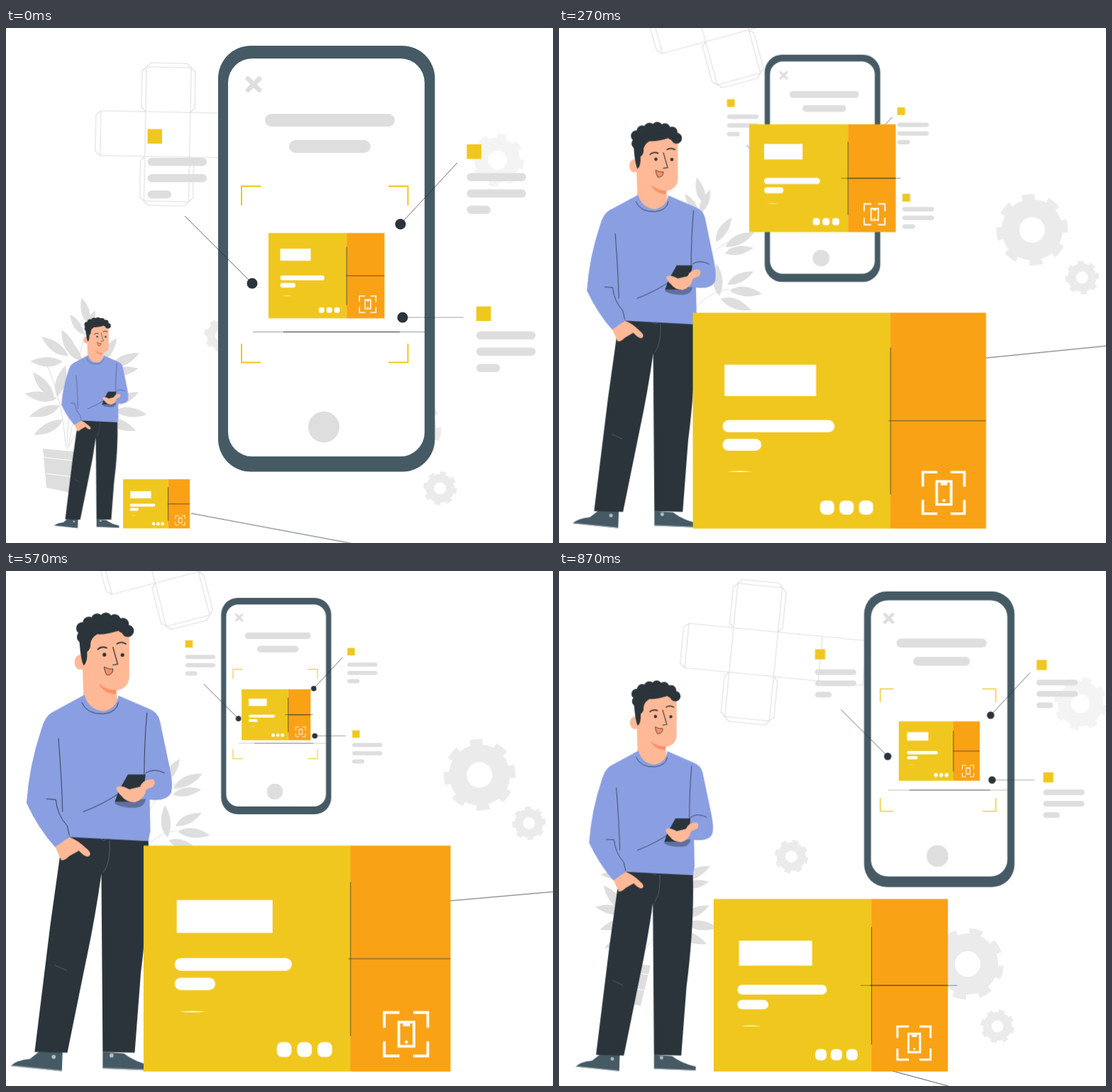
An HTML page without scripts that plays this animation: 771 px wide and 726 px high, repeating every 0.9 s.

```html
<!DOCTYPE html>
<html lang="en">
<head>
<meta charset="utf-8">
<title>Package scan</title>
<style>
  html, body { margin: 0; height: 100%; overflow: hidden; background: #fff; }
  svg { display: block; width: 100vw; height: 100vh; }

  .yellow { fill: #f0c71e; }
  .orange { fill: #f9a215; }
  .white { fill: #fff; }
  .grey { fill: #dedede; }
  .dark { fill: #2a343a; }
  .slate { fill: #455a64; }
  .skin { fill: #ffb997; }
  .blush { fill: #ff8f66; }
  .shirt { fill: #8a9ee2; }
  .line { fill: none; stroke: #263238; stroke-width: .9; }
  .hair-line { vector-effect: non-scaling-stroke; stroke-width: .7; }
  .reach { stroke-width: .5; }
  .net { fill: none; stroke: #dedede; stroke-width: 1.1; }
  .gear { fill: none; stroke: currentColor; }
  .icon { fill: none; stroke: #fff; stroke-width: 4; }

  .phone, .backdrop, .box, .plant { animation: 900ms cubic-bezier(.67, 0, .33, 1) infinite; }
  .phone { animation-name: phone; transform-origin: 451.5px 325px; }
  .backdrop { animation-name: backdrop; transform-origin: 450px 300px; }
  .box { animation-name: box; }
  .plant { animation-name: plant; }
  .man { animation: man 900ms cubic-bezier(.37, 0, .63, 1) infinite; transform-origin: 120px 705px; }
  .pulse { animation: pulse 450ms linear infinite; transform-origin: 451.6px 347.5px; }
  .pulse .reach { animation: reach-pulse 450ms step-end infinite; }
  .box .reach { animation: reach-box 900ms step-end infinite; }

  @keyframes phone {
    0%, 6.2% { transform: none; animation-timing-function: cubic-bezier(.76, 0, .24, 1); }
    40.7%, 51.2% { transform: translate(-88.3px, -140px) scale(.487); }
    92.9%, 100% { transform: translate(84.3px, -88px) scale(.694); }
  }
  @keyframes backdrop {
    0%, 6.2% { transform: translate(-32.5px, 21.2px) rotate(-4.5deg); animation-timing-function: cubic-bezier(.76, 0, .24, 1); }
    40.7%, 51.2% { transform: translate(13px, -231px) rotate(-22.4deg); }
    92.9%, 100% { transform: none; }
  }
  @keyframes box {
    0%, 6.2% { transform: translate(165px, 705.5px) scale(.2115); animation-timing-function: cubic-bezier(.76, 0, .24, 1); }
    40.7%, 50.6% { transform: translate(191px, 705.5px) scale(1); }
    93.3%, 100% { transform: translate(218px, 705.5px) scale(.742); }
  }
  @keyframes plant {
    0%, 6.2% { transform: none; animation-timing-function: cubic-bezier(.76, 0, .24, 1); }
    40.7%, 51.2% { transform: translate(96px, -187px); }
    92.9%, 100% { transform: translate(25px, -42px); }
  }
  @keyframes man {
    0% { transform: scale(.441); }
    46.67% { transform: scale(1.007); }
    96.67%, 100% { transform: scale(.817); }
  }
  @keyframes pulse {
    0% { transform: none; animation-timing-function: ease-in; }
    26.67% { transform: scale(1.16); }
    46.67% { transform: scale(2.14); }
    60% { transform: scale(2.36); animation-timing-function: ease-out; }
    73.33% { transform: scale(2.65); animation-timing-function: ease-in-out; }
    93.33%, 100% { transform: scale(1.005); }
  }
  @keyframes reach-pulse { 0%, 85% { opacity: 0; } 20% { opacity: 1; } 100% { opacity: 0; } }
  @keyframes reach-box { 0% { opacity: 0; } 80%, 100% { opacity: 1; } }
</style>
</head>
<body>
<svg viewBox="0 0 771 726">
  <defs>
    <g id="gear" class="gear">
      <circle r="30.5" stroke-width="25"/>
      <circle r="46" stroke-width="9" pathLength="16" stroke-dasharray="1" transform="rotate(3)"/>
    </g>

    <g id="bars" class="grey">
      <rect width="83.5" height="11.5" rx="5.75"/>
      <rect y="23" width="83.5" height="11.5" rx="5.75"/>
      <rect y="46" width="33.5" height="11.5" rx="5.75"/>
    </g>

    <path id="leaf" d="M0 0Q18 -15 46 0Q22 12 0 0"/>

    <!-- Origin at the bottom left corner -->
    <g id="parcel" transform="translate(0 -327.5)">
      <path class="yellow" d="M0 0H300.5V327.5H0z"/>
      <path class="orange" d="M300 0H445V327.5H300z"/>
      <g class="white">
        <path d="M52 241Q71 239 90 241Q71 242.5 52 241"/>
        <rect x="45" y="163" width="170" height="18.5" rx="9.25"/>
        <rect x="45" y="191.5" width="59" height="18" rx="9"/>
        <rect x="193" y="285" width="21.5" height="21.5" rx="8"/>
        <rect x="222.5" y="285" width="21.5" height="21.5" rx="8"/>
        <rect x="252" y="285" width="21.5" height="21.5" rx="8"/>
        <path d="M376 258H386V262H376z"/>
        <circle cx="381" cy="285" r="2.3"/>
      </g>
      <path class="icon" d="M349 264V242H371M391 242H412V264M412 284V305H391M371 305H349V284M370 256H392V291H370z"/>
      <path class="line hair-line" d="M300 53V276M297 164H445"/>
    </g>
  </defs>

  <g class="backdrop">
    <path class="net" transform="translate(246 80) rotate(5.6)" d="M-63 0H189V63H-63zM0 -63H63V126H0zM126 0V63
      M-63 0l-7 6v51l7 6M0 -63l-6 6v51l6 6M63 -63l6 6v51l-6 6M0 -63l6 -6h51l6 6
      M0 63l-6 6v51l6 6M63 63l6 6v51l-6 6M0 126l6 6h51l6 -6"/>
    <g color="#ebebeb">
      <use href="#gear" transform="translate(576 554)"/>
      <use href="#gear" transform="translate(618 642) scale(.47)"/>
      <use href="#gear" transform="translate(327.5 402.5) scale(.47)"/>
      <use href="#gear" color="#f4f4f4" transform="translate(735 187) scale(.74)"/>
    </g>
    <path class="line hair-line" d="M265 649.5L630 748"/>
  </g>

  <g class="plant grey">
    <path fill="none" stroke="#dedede" d="M86 595Q84 540 116 410M88 590Q100 500 150 472M84 590Q80 520 55 470M88 590Q110 545 152 538"/>
    <use href="#leaf" transform="translate(118 418) rotate(-107) scale(.85)"/>
    <use href="#leaf" transform="translate(112 432) rotate(-68) scale(.8)"/>
    <use href="#leaf" transform="translate(110 432) rotate(-125) scale(.75)"/>
    <use href="#leaf" transform="translate(108 470) rotate(-130)"/>
    <use href="#leaf" transform="translate(147 479) rotate(-27)"/>
    <use href="#leaf" transform="translate(134 472) rotate(-58) scale(.9)"/>
    <use href="#leaf" transform="translate(146 488) rotate(-11) scale(.9)"/>
    <use href="#leaf" transform="translate(139 548) rotate(-95)"/>
    <use href="#leaf" transform="translate(150 532) rotate(-27) scale(.9)"/>
    <use href="#leaf" transform="translate(153 540) rotate(6)"/>
    <use href="#leaf" transform="translate(140 552) rotate(20)"/>
    <use href="#leaf" transform="translate(80 470) rotate(180)"/>
    <use href="#leaf" transform="translate(88 462) rotate(-145)"/>
    <use href="#leaf" transform="translate(100 466) rotate(-118)"/>
    <use href="#leaf" transform="translate(68 520) rotate(-131)"/>
    <use href="#leaf" transform="translate(72 520) rotate(-75)"/>
    <use href="#leaf" transform="translate(72 522) rotate(188)"/>
    <use href="#leaf" transform="translate(76 532) rotate(160)"/>
    <use href="#leaf" transform="translate(80 552) rotate(152)"/>
    <path d="M52 593L104 598L90 655L57 648z"/>
    <path fill="none" stroke="#fff" d="M53 605L102 611M56 628L97 633"/>
  </g>

  <g class="phone">
    <rect class="slate" x="299" y="25" width="305.5" height="600.5" rx="46"/>
    <rect class="white" x="313" y="43" width="277" height="561" rx="34"/>
    <path fill="none" stroke="#dedede" stroke-width="6.5" stroke-linecap="round" d="M341 71.5L357 87.5M357 71.5L341 87.5"/>
    <g class="grey">
      <rect x="365" y="121" width="183" height="18" rx="9"/>
      <rect x="399" y="158" width="115" height="18" rx="9"/>
      <circle cx="448" cy="562.5" r="22"/>
    </g>
    <path fill="none" stroke="#f0c71e" stroke-width="2" d="M332 250V223H359M539 223H566.5V250M332 445V471.5H359M539 471.5H566.5V445"/>
    <path class="line" stroke-opacity=".5" d="M348 428.5H590"/>
    <path class="line" d="M391 428.5H555"/>
    <path class="line hair-line" d="M252 265L347 360M556 276.5L636 190"/>
    <path class="line hair-line" stroke-opacity=".6" d="M559 408H645"/>
    <g class="dark">
      <circle cx="556" cy="276.5" r="7.5"/>
      <circle cx="347" cy="360" r="7.5"/>
      <circle cx="559" cy="408" r="7.5"/>
    </g>
    <path class="yellow" d="M199.5 142.5h20.5v20.5h-20.5zM649.5 164h20.5v20.5h-20.5zM663 392.5h20.5v20.5h-20.5z"/>
    <use href="#bars" x="199.5" y="183"/>
    <use href="#bars" x="649.5" y="204.5"/>
    <use href="#bars" x="663" y="427.5"/>
    <g class="pulse">
      <g transform="translate(370 409.3) scale(.3674)">
        <use href="#parcel"/>
        <path class="white" d="M45 -267.5H162V-221H45z"/>
        <path class="line hair-line reach" d="M279 -163.5H460"/>
      </g>
    </g>
  </g>

  <g class="man">
    <path class="slate" d="M43 677L78 676L77 705L2 697Q10 689 30 687zM137 677L168 679Q185 692 209 697V704L137 701z"/>
    <path fill="none" stroke="#9aa5aa" stroke-width="1.5" d="M2 697L77 704.5M137 700.5L209 703.5"/>
    <g fill="#b5bdc1"><circle cx="65" cy="684" r="3"/><circle cx="150" cy="682" r="3"/></g>
    <path class="dark" d="M86 355L204 362Q207 450 193 560L184 678L137 677L135 415Q126 480 112 545L85 678L37 677L60 490L74 390z"/>
    <path fill="none" stroke="#56666e" d="M147 366Q149 398 138 413M66 549L84 557M134 363q4 6 8 1"/>

    <path class="skin" d="M67 375L88 361Q101 366 112 377Q122 385 117 389Q112 392 102 381L88 389Q81 396 76 395z"/>
    <path class="skin" d="M106 66L109 165Q134 200 159 163L157 146Q176 142 176 125V58Q150 40 118 58z"/>
    <ellipse class="skin" cx="104" cy="104" rx="8.5" ry="11"/>
    <path class="blush" d="M131 135Q143 146 157 145L156 151Q138 150 131 135"/>

    <path class="dark" d="M102 62Q110 40 140 39Q170 40 176 62Q167 64 160 58Q140 64 129 63Q120 68 119 77Q120 84 114 89Q115 104 109 109Q104 100 102 62"/>
    <path fill="none" stroke="#2a343a" stroke-width="18" stroke-linecap="round" stroke-dasharray="0 13" d="M108 67Q102 51 117 46Q140 34 163 46Q176 52 174 66"/>
    <g class="dark"><circle cx="139.500" cy="93" r="2.700"/><circle cx="166" cy="93.500" r="2.700"/></g>
    <path class="line" stroke-linecap="round" style="stroke-width:2" d="M130 85Q135 80 143 83M158 77Q164 73 171 77"/>
    <path class="line" stroke-linecap="round" style="stroke-width:1.300" d="M152 82L159 107L152 108"/>
    <path class="blush" stroke="#263238" stroke-width=".9" d="M139 111Q146 115 152 114Q152 123 143 123Q140 119 139 111"/>

    <path class="shirt" d="M110 152L62 178Q52 184 47 202Q29 255 25 311Q42 348 67 376L88 361L204 367L207 352L206 306Q230 309 237 297Q241 288 236 262L221 190Q218 178 206 173L160 153Q158 172 138 176Q116 174 110 152"/>
    <path class="line" d="M72 216Q77 280 78 324M54 305L68 306Q70 328 85 345L88 359M202 178Q198 220 198 272M106 163Q114 181 138 180Q158 178 160 163M108 324Q140 312 165 294M200 267Q212 259 228 267"/>
    <path fill="#5f6f9f" d="M155 307L200 305Q199 317 184 318Q164 318 155 312z"/>
    <path class="dark" d="M174 269H200L197 292L187 309H155L160 294z"/>
    <path class="skin" d="M157 288Q164 284 176 291L192 287Q196 276 211 276Q216 280 211 287L201 291Q198 306 184 310Q170 309 165 301Q157 294 157 288"/>
  </g>

  <g class="box">
    <use href="#parcel"/>
    <path class="white" d="M48 -248.5H187V-201H48z"/>
    <path class="line hair-line reach" d="M279 -163.5H463"/>
  </g>
</svg>
</body>
</html>
```
